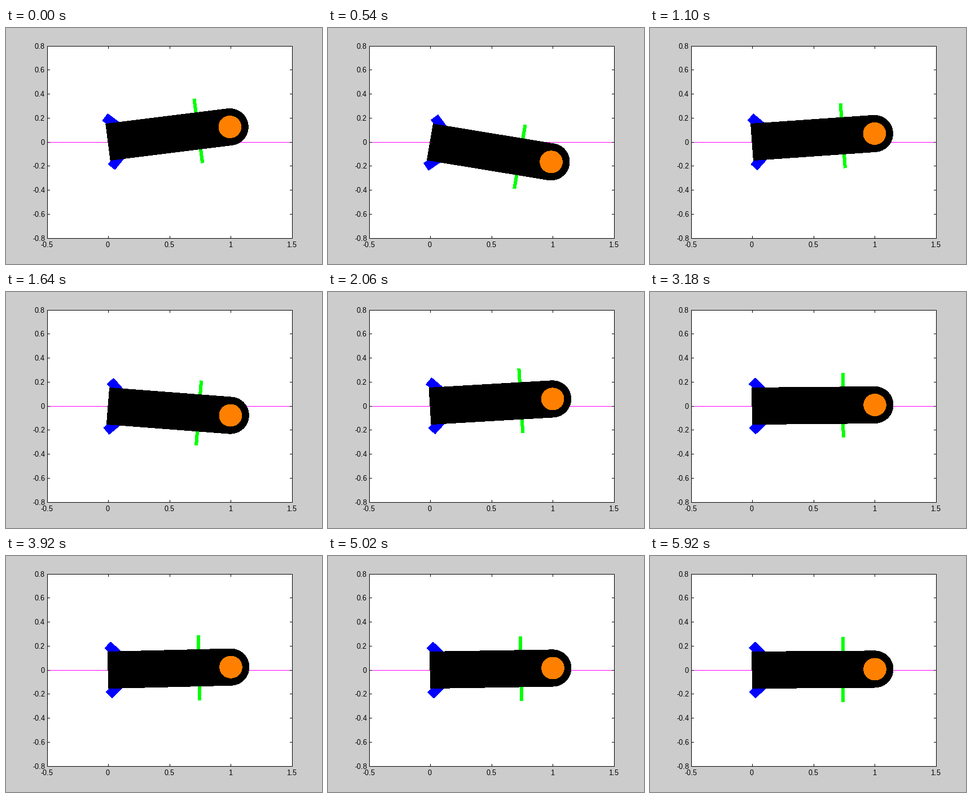
Write a matplotlib script that moves like this. It is 560x420 px and loops after 6.02 s.

```python
import math

import numpy as np
import matplotlib.pyplot as plt
from matplotlib.animation import FuncAnimation
from matplotlib.patches import Polygon, Rectangle

W, H, DPI = 560, 420, 70
PX = 72 / DPI                      # one pixel in points
LEFT, RIGHT, TOP, BOTTOM = 73, 507, 32, 374
FRAMES, STEP = 301, 20

plt.rcParams["text.hinting"] = "native"
plt.rcParams["text.hinting_factor"] = 1

fig = plt.figure(figsize=(W / DPI, H / DPI), dpi=DPI, facecolor="#cccccc")
ax = fig.add_axes([0, 0, 1, 1])
ax.set_xlim(0, W)
ax.set_ylim(H, 0)
ax.axis("off")


def to_px(x, y):
    """Map plot units to stage pixels."""
    return (LEFT + (np.asarray(x) + 0.5) * (RIGHT - LEFT) / 2,
            TOP + (0.8 - np.asarray(y)) * (BOTTOM - TOP) / 1.6)


def line(xs, ys, color="black", width=1, z=2, cap="butt"):
    return ax.plot(xs, ys, color=color, lw=width * PX, zorder=z, snap=False,
                   antialiased=False, solid_capstyle=cap)[0]


def rule(x0, y0, x1, y1, color="black", z=2):
    """One-pixel line through the centres of the given pixels."""
    line([x0 + 0.5, x1 + 0.5], [y0 + 0.5, y1 + 0.5], color, z=z,
         cap="projecting")


def label(x, y, value, align):
    ax.text(x, y, f"{value:g}", ha=align, va="baseline", color="black",
            family="Liberation Sans", fontsize=13 * PX)


def draw_axes():
    ax.add_patch(Rectangle((LEFT, TOP), RIGHT - LEFT, BOTTOM - TOP,
                           fc="white", ec="none", zorder=0))
    zero = math.floor(to_px(0, 0)[1])
    rule(LEFT, zero, RIGHT, zero, "#ff00ff", z=1)
    for y in (TOP, BOTTOM):
        rule(LEFT, y, RIGHT, y)
    for x in (LEFT, RIGHT):
        rule(x, TOP, x, BOTTOM)
    for i in range(5):
        value = -0.5 + 0.5 * i
        x = math.floor(to_px(value, 0)[0])
        rule(x, TOP, x, TOP + 4)
        rule(x, BOTTOM, x, BOTTOM - 4)
        label(x - 0.5, 390, value, "center")
    for i in range(9):
        value = round(-0.8 + 0.2 * i, 1) + 0.0
        y = math.floor(to_px(0, value)[1])
        rule(LEFT, y, LEFT + 4, y)
        rule(RIGHT, y, RIGHT - 4, y)
        label(69, y + 5, value, "right")


def arc(cx, radius, start, end):
    a = np.linspace(start, end, 80)
    return np.column_stack([cx + radius * np.cos(a), radius * np.sin(a)])


# Parts of the body in its own frame, pivot at the origin
R = 0.15
FINS = [np.array([[0, s * 0.208], [0.15, s * 0.06]]) for s in (1, -1)]
ROD = np.array([[0.74, 0.268], [0.74, -0.268]])
HULL = np.vstack([[[0, -R]], arc(0.997, R, -np.pi / 2, np.pi / 2), [[0, R]]])
DISC = arc(1, 0.091, 0, 2 * np.pi)


def angle(t):
    """Damped swing around a slowly settling rest angle."""
    swing = 0.175 * np.exp(-0.37 * t) * np.cos(2 * np.pi * (t + 0.003))
    rest = -0.0095 - 0.026 * np.exp(-t / 1.5)
    release = -0.013 * np.exp(-(t / 0.2) ** 2)
    return swing + rest + release


def turn(points, a):
    x, y = points.T
    return to_px(x * np.cos(a) - y * np.sin(a), x * np.sin(a) + y * np.cos(a))


def shape(color, width, z):
    patch = Polygon([[0, 0], [1, 0], [1, 1]], fc=color, ec=color,
                    lw=width * PX, zorder=z, antialiased=False, snap=False)
    return ax.add_patch(patch)


draw_axes()
fins = [line([], [], "#0000ff", 15, 3) for _ in FINS]
rod = line([], [], "#00ff00", 5, 4)
hull = shape("black", 1, 5)
disc = shape("#ff8000", 0, 6)


def update(i):
    a = angle(i * STEP / 1000)
    for art, points in zip(fins + [rod], FINS + [ROD]):
        art.set_data(*turn(points, a))
    for art, points in ((hull, HULL), (disc, DISC)):
        art.set_xy(np.column_stack(turn(points, a)))
    return [*fins, rod, hull, disc]


anim = FuncAnimation(fig, update, frames=FRAMES, interval=STEP,
                     repeat=True, repeat_delay=0, blit=False)
plt.show()
```
